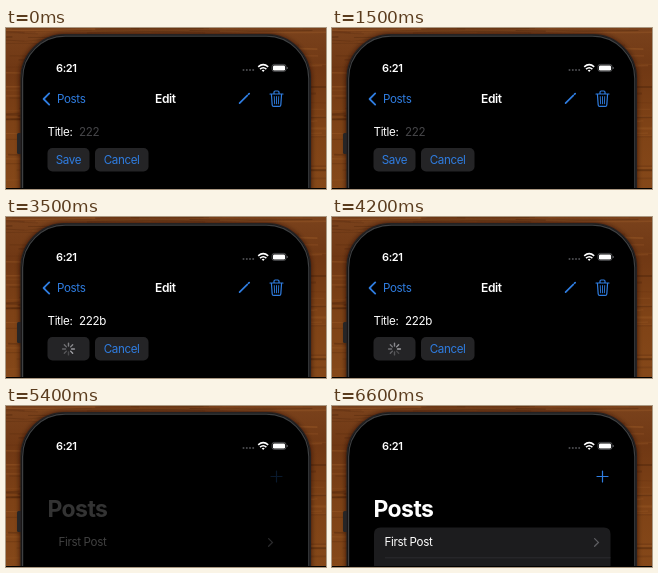
An HTML page that plays this animation: 320 px wide and 161 px high, repeating every 7900 ms.

```html
<!DOCTYPE html>
<html lang="en">
<head>
<meta charset="utf-8">
<title>Edit post</title>
<style>
  html, body { margin: 0; width: 100%; height: 100%; overflow: hidden; background: #000; }
  svg { display: block; width: 100%; height: 100%; }
  text { font: 400 11.6px Inter, "Liberation Sans", sans-serif; letter-spacing: -.35px; fill: #fff; white-space: pre; }
  .bold { font-weight: 600; }
  .blue { fill: #2f7de1; }
  .line { fill: none; stroke: #2f7de1; stroke-width: 1.2; stroke-linecap: round; stroke-linejoin: round; }
</style>
</head>
<body>
<svg viewBox="0 0 320 161" preserveAspectRatio="none">
  <defs>
    <linearGradient id="wood" x2="0" y2="1">
      <stop offset="0" stop-color="#7a421c"/>
      <stop offset=".25" stop-color="#703814"/>
      <stop offset=".6" stop-color="#7e4216"/>
      <stop offset="1" stop-color="#854819"/>
    </linearGradient>
    <filter id="soft" x="-10%" y="-10%" width="120%" height="120%"><feGaussianBlur stdDeviation="2.5"/></filter>
    <clipPath id="screen"><rect x="20" y="11" width="280" height="210" rx="38"/></clipPath>
    <clipPath id="listArea"><rect x="33" y="60" width="262" height="100"/></clipPath>
  </defs>

  <rect width="320" height="161" fill="url(#wood)"/>
  <g id="grain" fill="none"></g>

  <g id="phone">
    <rect x="14" y="6" width="291" height="220" rx="45" fill="#1c0d05" opacity=".75" filter="url(#soft)"/>
    <rect x="11" y="105" width="5" height="21" rx="1.5" fill="#262526"/>
    <rect x="15" y="6.6" width="289.4" height="220" rx="44" fill="#0a0a0b" stroke="#242122" stroke-width="1.2"/>
    <rect x="16.6" y="8.2" width="286.2" height="220" rx="42.5" fill="#000" stroke="#3e4042" stroke-width="1.2"/>
  </g>

  <g id="status">
    <text class="bold" x="50" y="44" style="font-size:11px">6:21</text>
    <g fill="#4c4d50">
      <circle cx="237.5" cy="42" r="1"/><circle cx="240.8" cy="42" r="1"/>
      <circle cx="244" cy="42" r="1"/><circle cx="247.2" cy="42" r="1"/>
    </g>
    <g fill="none" stroke="#fff" stroke-width="1.6">
      <path d="M252.2 38.9Q257.2 34.5 262.2 38.9M254 41.1Q257.2 38.4 260.4 41.1"/>
      <path d="M255.7 42.3L257.2 44.1L258.7 42.3Q257.2 41.2 255.7 42.3Z" fill="#fff" stroke="none"/>
    </g>
    <rect x="266" y="36.4" width="14" height="7" rx="2.2" fill="none" stroke="#66676a" stroke-width=".7"/>
    <rect x="267" y="37.4" width="12" height="5" rx="1.2" fill="#fff"/>
    <path d="M281.2 39v2" stroke="#66676a"/>
  </g>

  <g clip-path="url(#screen)">
    <g id="list">
      <g clip-path="url(#listArea)">
        <g id="row">
          <path id="card" d="M42 161V128Q42 121.5 48.5 121.5H272Q278.5 121.5 278.5 128V161Z" fill="#1c1c1e"/>
          <path id="rule" d="M53 151.8H278.5" stroke="#303033" stroke-width=".8"/>
          <text id="rowText" x="52.5" y="140.4">First Post</text>
          <path id="arrow" d="M262.6 132.6L266.4 136.4L262.6 140.2" fill="none" stroke="#5c5c60" stroke-width="1.3" stroke-linecap="round"/>
        </g>
      </g>
      <path id="plus" class="line" d="M265 70.5H276M270.5 65V76"/>
    </g>

    <path id="back" class="line" d="M43.2 65.4L37.6 71L43.2 76.6" style="stroke-width:1.8"/>
    <text id="heading">Posts</text>

    <g id="tools" class="line">
      <path d="M233.6 75.2L241.4 67.4" style="stroke-width:1.7"/>
      <path d="M242.6 66.2L243.2 65.6" style="stroke-width:1.7"/>
      <path d="M264 66H277M268 66V64.2Q268 63 269.2 63H271.8Q273 63 273 64.2V66M265.4 66L266.2 77Q266.3 78.4 267.7 78.4H273.3Q274.7 78.4 274.8 77L275.6 66"/>
      <path d="M268.3 68.6L268.6 75.8M270.5 68.6V75.8M272.7 68.6L272.4 75.8" style="stroke-width:.9"/>
    </g>
    <text id="title" class="bold" x="149" y="75" style="font-size:12px">Edit</text>

    <g id="form">
      <text x="41.5" y="108">Title:</text>
      <text id="field" x="73" y="108"></text>
      <rect id="caret" y="97" width="1.4" height="14" rx=".7" fill="#2f7de1"/>
      <g id="buttons">
        <rect x="41.5" y="120" width="42" height="23.5" rx="5" fill="#242426"/>
        <rect x="89" y="120" width="53.5" height="23.5" rx="5" fill="#242426"/>
        <text id="save" class="blue" x="62.5" y="136" text-anchor="middle">Save</text>
        <text class="blue" x="115.6" y="136" text-anchor="middle">Cancel</text>
        <g id="spinner" stroke="#a4a4a8" stroke-width="1.4" stroke-linecap="round"></g>
      </g>
    </g>
  </g>
  <rect y="160" width="320" height="1"/>
</svg>

<script>
const LOOP = 7900, STEP = 100, POP = 4700, POP_END = 5400, READY = 6100;
const NS = "http://www.w3.org/2000/svg";
const $ = id => document.getElementById(id);
const set = (id, attrs) => { for (const k in attrs) $(id).setAttribute(k, attrs[k]); };
const clamp = v => Math.max(0, Math.min(1, v));
const span = (t, a, b) => clamp((t - a) / (b - a));
const smooth = v => v * v * (3 - 2 * v);
const mix = (a, b, p) => a + (b - a) * p;

function add(parent, tag, attrs) {
  const el = document.createElementNS(NS, tag);
  for (const k in attrs) el.setAttribute(k, attrs[k]);
  return $(parent).appendChild(el);
}

// Wood grain: seeded, gently wavy streaks.
let seed = 7;
const rnd = () => (seed = seed * 16807 % 2147483647) / 2147483647;
for (let i = 0; i < 130; i++) {
  const y = rnd() * 161, x = rnd() * 300 - 60, w = 40 + rnd() * 140, bend = rnd() * 6 - 3;
  add("grain", "path", {
    d: `M${x} ${y}q${w / 2} ${bend} ${w} 0`,
    stroke: rnd() < .6 ? "#4c240b" : "#9a5a28",
    "stroke-width": .6 + rnd() * 1.4, opacity: .15 + rnd() * .3
  });
}

const spokes = Array.from({ length: 8 }, (_, i) => add("spinner", "path", {
  d: "M0 -3V-5.9", transform: `translate(62.5 132) rotate(${i * 45})`
}));

function typed(t) {
  if (t < 1800 || t >= POP) return "";
  if (t < 2500) return "222".slice(0, t < 1900 ? 1 : t < 2100 ? 2 : 3);
  return "222b";
}

// Solid while typing, then a one second blink with short fades.
function caretAlpha(t) {
  if (t < 900 || t >= POP) return 0;
  if (t < 1700) return 1 - span(t, 1200, 1500);
  if (t < 3100) return 1;
  const k = (t - 3100) % 1000;
  return k < 500 ? 1 - span(k, -100, 100) : span(k, 400, 600);
}

function drawForm(t, p) {
  const text = typed(t);
  const busy = t >= 3300;
  const fade = 1 - span(t, POP - STEP, 5120);
  $("field").textContent = text || "222";
  set("field", { style: text ? "" : "fill:#464649" });
  set("caret", { x: 72.6 + text.length * 6.75, opacity: caretAlpha(t) });
  set("save", { opacity: busy ? 0 : t >= 3200 ? .4 : 1 });
  set("spinner", { opacity: busy ? 1 : 0 });
  const head = Math.floor(t / STEP) % 8;
  spokes.forEach((s, i) => s.setAttribute("opacity", 1 - .1 * ((head - i + 8) % 8)));
  set("buttons", { opacity: 1 - span(t, POP - STEP, 4900) });
  set("form", { transform: `translate(${278 * p} 0)`, opacity: fade });
  set("title", { transform: `translate(${115 * p} 0)`, opacity: fade });
  set("tools", { opacity: fade * fade ** .5 });
  set("back", { opacity: 1 - span(t, POP - STEP, 4900) });
}

// The back label grows into the large heading.
function drawHeading(t, p) {
  const size = mix(11.6, 23, p), tint = span(t, 4900, POP_END);
  const color = [47, 125, 225].map(c => Math.round(mix(c, 255, tint)));
  const alpha = t < POP || t >= READY ? 1 : mix(1, .17, span(t, POP - STEP, 5000)) + .03 * tint;
  set("heading", {
    x: mix(51, 41.5, p), y: mix(75, 110.5, smooth(p) * .1 + p * .9), opacity: alpha,
    style: `font-size:${size}px;font-weight:${Math.round(mix(400, 700, p))};` +
      `letter-spacing:${mix(-.35, -.6, p)}px;fill:rgb(${color})`
  });
}

function drawList(t, p) {
  const ready = t >= READY;
  set("list", { opacity: t < POP ? 0 : 1 });
  set("row", { transform: `translate(${-74 * (1 - p)} 0)` });
  set("rowText", { opacity: ready ? 1 : .25 * span(t, POP - STEP, 4900) });
  set("arrow", { opacity: ready ? 1 : .45 * span(t, 5000, POP_END) });
  set("card", { opacity: ready ? 1 : 0 });
  set("rule", { opacity: ready ? 1 : 0 });
  set("plus", { opacity: ready ? 1 : .2 * span(t, 5000, POP_END) });
}

function draw(time) {
  const t = Math.floor(time % LOOP / STEP) * STEP;
  const p = smooth(span(t, POP, POP_END));
  drawForm(t, p);
  drawHeading(t, p);
  drawList(t, p);
}

const start = performance.now();
function tick() {
  draw(performance.now() - start);
  requestAnimationFrame(tick);
}
tick();
</script>
</body>
</html>
```
